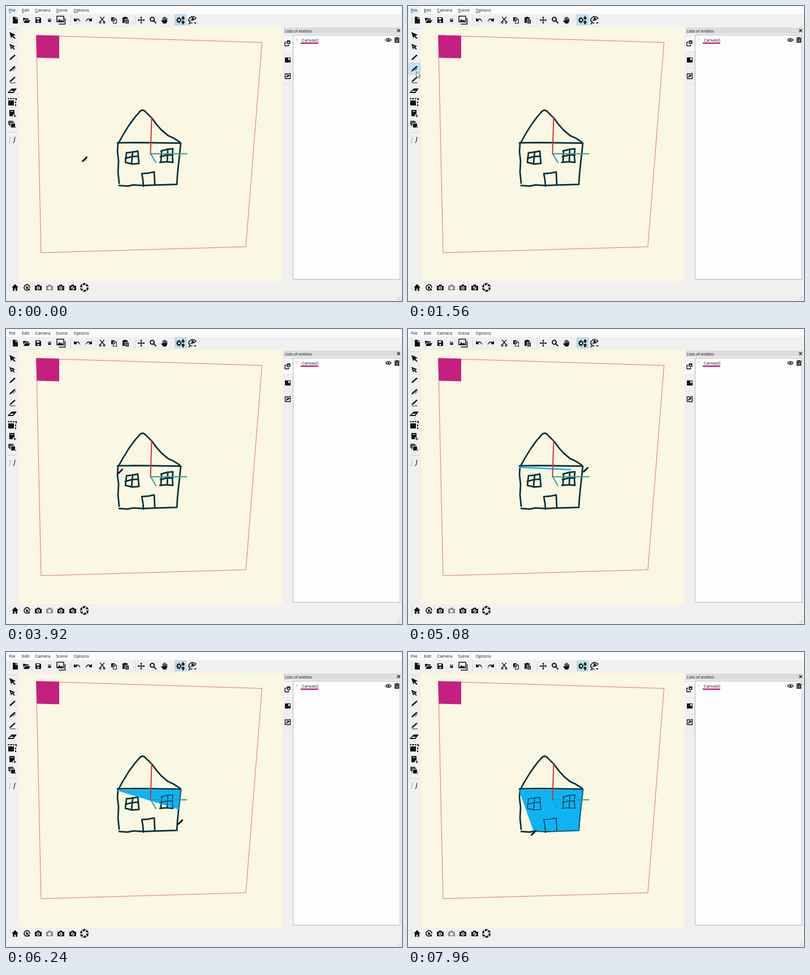
Recreate the animation shown at these times as an HTML page. Size 700x522 px, loop 8 s.

```html
<!DOCTYPE html>
<html lang="en">
<head>
<meta charset="utf-8">
<title>Lasso fill</title>
<style>
html, body { margin: 0; width: 100%; height: 100%; overflow: hidden; background: #f0f0f0; }
svg { display: block; width: 100%; height: 100%; }
text { font-family: "Open Sans", "Noto Sans", sans-serif; font-size: 7.4px; fill: #111; }
.line { fill: none; stroke-linecap: round; stroke-linejoin: round; }
</style>
</head>
<body>
<svg id="stage" viewBox="0 0 700 522">
  <defs>
    <clipPath id="inside"><polygon id="clipShape"/></clipPath>
    <g id="house" class="line" stroke="#052f3a">
      <path d="M200 241L206 230 217 212 228 197 235 189Q241 181 247 188L258 199 267 211 275 220 287 230 296 234 307 241"/>
      <path d="M197 242.500L230 242 270 242.500 309 243 307 262 305 280 303 300 302 316 270 317 243 318 225 317 215 319 200 318"/>
      <path d="M198 244L197 258 199 275 198 294 200 314"/>
      <path d="M213 260L224 259 233 257 234 268 235 279 223 280 211 277 213 260M224 258L222 279M211 270L222 267 234 266"/>
      <path d="M274 257L285 254 295 253 294 265 295 277 284 276 272 277M275 257L274 275M286 254L285 276M273 267L284 264 295 264"/>
      <path d="M243 319L242 308 240 297 252 296 262 294 263 316"/>
    </g>
  </defs>

  <rect width="700" height="522" fill="#f0f0f0"/>
  <rect width="700" height="14" fill="#fbfbfb"/>
  <rect id="fileGlow" y="1" width="22" height="13" fill="#e5f3fb"/>
  <g id="menu"></g>

  <rect x="23" y="36.500" width="466" height="450.500" fill="#faf7e2"/>
  <path d="M53.500 52L452.500 64.500 424 426 62 436.500Z" fill="none" stroke="#dc69a8"/>
  <path d="M53.500 51.500L94 52.500V92.500L54.500 91.500Z" fill="#c51f80"/>

  <use href="#house" stroke-width="2.700" y="-.4"/>
  <g class="line" stroke-width="2">
    <path d="M255.500 261L265 277" id="depth"/>
    <path d="M255.500 261.500H319.500" stroke="#2aa198"/>
  </g>
  <polygon id="fill" fill="#0fb3f5" stroke="#0fb3f5" stroke-width="1.600" stroke-linejoin="round"/>
  <g clip-path="url(#inside)">
    <use href="#house" stroke-width="1.400" y="-.4"/>
    <path d="M255.500 261.500H319.500" class="line" stroke="#2a9a94" stroke-width="1.500"/>
    <path d="M255.500 261L265 277" class="line" stroke="#2487a5"/>
  </g>
  <path d="M257.500 197L255.500 261" class="line" stroke="#d3303a" stroke-width="2"/>

  <rect x="491" y="38" width="207" height="11" fill="#dcdcdc"/>
  <text x="493" y="46.500" style="font-size:6.900px">Lists of entities</text>
  <path d="M691.500 41l5 5m0-5l-5 5" stroke="#111" stroke-width="1.100"/>
  <path d="M490.500 52.500H505.500M490.500 80.500H505.500M490.500 109.500H505.500M490.500 137.500H505.500" stroke="#e2e2e2"/>
  <rect x="490" y="53" width="17" height="27" fill="#f8f8f8"/>
  <rect x="507.500" y="51.500" width="189" height="432" fill="#fefefe" stroke="#b4b6ba"/>
  <path d="M512.500 57l2.500 2.500-2.500 2.500" fill="none" stroke="#999" stroke-width=".8"/>
  <text x="523" y="62.500">Canvas0</text>
  <rect x="521" y="64.500" width="31" height="2.500" fill="#c51f80"/>

  <rect id="toolGlow" x="1.500" y="101.500" width="20" height="19" fill="#c4e2f1" stroke="#9fd0ea"/>
  <rect x="299.500" y="15.500" width="19" height="18" fill="#c3e1f0" stroke="#a5d2ea"/>
  <g id="icons"></g>
  <g id="handles" fill="#aaa"></g>

  <path id="arrow" d="M0 0V10.500L2.400 8.300 4.100 12 5.800 11.300 4.200 7.600H7.300Z" fill="#fff" stroke="#333" stroke-width=".8"/>
  <g id="pen">
    <path id="smear" d="M2.500-1L5-6 10-7 9-3.500 5-1.500Z" fill="#b9b8ae"/>
    <path d="M-.3.300L.8-2.800 8.500-10.300 10.500-8.500 3-.800Z" fill="#101010"/>
  </g>
</svg>

<script>
const NS = "http://www.w3.org/2000/svg";
const $ = id => document.getElementById(id);
const LOOP = 8000;

function add(parent, tag, attrs, text) {
  const node = document.createElementNS(NS, tag);
  for (const key in attrs) node.setAttribute(key, attrs[key]);
  if (text) node.textContent = text;
  parent.appendChild(node);
  return node;
}

// Menu labels with mnemonic underlines
const underlines = [];
[["File", 5, 4], ["Edit", 28, 4], ["Camera", 51.5, 5], ["Scene", 88.5, 4], ["Options", 119.5, 6]].forEach(([label, x, w]) => {
  add($("menu"), "text", { x, y: 10 }, label);
  underlines.push(add($("menu"), "rect", { x, y: 11, width: w, height: 0.8, fill: "#222" }));
});

function icon(x, y, solid, outline, color = "#111", width = 1.4) {
  const g = add($("icons"), "g", { transform: `translate(${x} ${y})` });
  if (solid) add(g, "path", { d: solid, fill: color, "fill-rule": "evenodd" });
  if (outline) add(g, "path", { d: outline, class: "line", stroke: color, "stroke-width": width });
}

const camera = "M-6-3H-3L-2-5H2L3-3H6V5H-6ZM0-2A3 3 0 1 0 .01-2Z";
const pencil = "M-5.500 5L-4.500 2 3.500-5 5.500-3.500-2.500 3.800Z";
const pages = "M-5-5H1V2H-5ZM-2-3H3L5-1V6H-2ZM-1-2V5H4V-.5H2V-2Z";

// Top bar
icon(16, 25, "M-4-6H1V-2H5V6H-4ZM2-6L5-3H2Z");
icon(36, 25, "M-6-4H-2L-1-3H4V-1H-3L-5 3ZM-2 0H7L4 5H-5Z");
icon(57, 25, "M-5-5H3L5-3V5H-5ZM-3-4V-1H2V-4ZM0 1A1.600 1.600 0 1 0 .01 1Z");
icon(77, 25, "M-2.500-2.500H2.500V3H-2.500ZM-1.500-1.500V0H1.500V-1.500Z");
icon(97, 25, "M-6 3L-3-2 0 1 2-1 4 3Z", "M-7-7H5V3H-7ZM7.500-3V7H-3", "#111", 1.5);
icon(126, 25, "M-6-4V2H0L-2 0Q2-3 5 4 5-5-4-2Z");
icon(146, 25, "M6-4V2H0L2 0Q-2-3-5 4-5-5 4-2Z");
icon(170, 25, "", "M-3.500-5.500L3 2M3.500-5.500L-3 2M-3.500 2.500a1.500 1.500 0 1 0 .01 0ZM3.500 2.500a1.500 1.500 0 1 0 .01 0Z", "#111", 1.3);
icon(191, 25, pages);
icon(211, 25, "M-5-5H-2V-6H1V-5H4V-2H-1V5H-5ZM0-1H6V6H0ZM1 1V2H5V1ZM1 3.500V4.500H5V3.500Z");
icon(239, 25, "M0-6.500L2-4H-2ZM0 6.500L2 4H-2ZM-6.500 0L-4-2V2ZM6.500 0L4-2V2Z", "M0-4V4M-4 0H4", "#111", 1.3);
icon(260, 25, "", "M-1.500-5A3.500 3.500 0 1 0-1.490-5ZM1.500 1.500L5 5", "#111", 1.9);
icon(280, 25, "M-3 0H5V2L3 6H-2L-6 1-5 0-3 1.500Z", "M-2.500 1V-4M-.300 1V-5.500M1.900 1V-5M4.200 1V-3", "#111", 1.5);
icon(309, 25, "", "M-3-3A3 3 0 1 0-2.990-3ZM4-5A1.600 1.600 0 1 0 4.010-5ZM4 2A1.600 1.600 0 1 0 4.010 2Z", "#111", 2);
icon(309, 25, "", "M-3-5V-4M-3 4V5M-7.500 0H-7M-6.300-3.500L-5.500-2.700M-6.300 3.500L-5.500 2.700M4-6.500V-5M4 6V7", "#111", 1.7);
icon(329, 24, "M3 5H8L5.500 7.500ZM1-4A2.200 2.200 0 1 0 1.010-4Z", "M-6-1Q0-9 7-3Q3 2-2 1M-6-1L-6 3M-4 2V6H0M-4 6L-6 8", "#111", 1.5);

// Left bar
icon(11, 52, "M-5-6L6-1 2 1 6 5 4 6 0 2-2 5Z");
icon(11, 72, "M-5-5L5-1 2 1 5 5 3 5 0 2-2 5ZM-2-2L-1 1 1 0Z");
icon(11.5, 91, pencil);
icon(11.5, 111, pencil);
icon(11.5, 111, "", "M1 3L5-1", "#777", 1.5);
icon(11.5, 130, pencil, "M-4 6H5", "#222", 1);
icon(11, 150, "M-8 3L-1-4H8L2 4H-7ZM-5 2H1L3 0H-3Z");
icon(11, 170, "M-7-3H3V6H-7ZM5-1H7V2H5ZM5 4H7V7H5Z", "M-7-6H-6M-3-6H-1M2-6H3M6-6H7V-4", "#111", 2);
icon(11, 190, "M-5-6H4V2H1V5H-5ZM-3-4V-3H2V-4ZM2 4H4V2H5V4H7V5H5V7H4V5H2Z");
icon(11, 209, "M-2-1H5V6H-2ZM3 5H7L5 7Z", "M-6 1V-5H1M-4 3V-3H3", "#111", 1.5);
icon(11, 237, "", "M-3-5L-4-1-4 2-6 5", "#aaa", 1);
icon(11, 237, "", "M5-5L4-1 4 2 2 5", "#222", 1.2);

// Bottom bar
icon(16, 498, "M0-6L6 0H4V6H1V2H-1V6H-4V0H-6Z");
icon(37, 498, "M-2-3L3 0-1 4ZM1 2H5V6Z", "M4 3A5 5 0 1 1 5 0", "#111", 1.7);
[57, 77, 97, 118].forEach((x, i) => icon(x, 498, camera, "", i === 1 ? "#888" : "#111"));
icon(57, 499, "M-2 0L1-2V2Z");
icon(97, 499, "M2 0L-1-2V2Z");
icon(118, 499, "", "M-2 2L2-2");
for (let i = 0; i < 6; i++) {
  const g = add($("icons"), "g", { transform: `translate(138.500 498) rotate(${i * 60})` });
  add(g, "path", { d: "M-3.300-7A7.800 7.800 0 0 1 3.300-7L-2-3Z", fill: "#111" });
}

// Entity panel
icon(497.5, 66, "M-1-5H5V1H-1ZM.500-2.500V-.500H3.500V-2.500Z", "M-2.500-2H-4.500V4.500H2V2.500", "#111", 1.4);
icon(498, 95, "M-5-4H5V5H-5ZM1-3V1L2.500 0 4 1V-3Z");
icon(498, 124, "", "M0-4H-4.500V4.500H4.500V-4.500H2M-2 2Q-2-1 2-1M0-3L2.500-1 0 1", "#111", 1.4);
icon(676, 60, "M0-1.800A1.800 1.800 0 1 0 .01-1.800Z", "M-5 0Q0-6 5 0Q0 6-5 0Z", "#111", 1.2);
icon(691, 60, "M-4.500-4H-1.500V-5H1.500V-4H4.500V-2.500H-4.500ZM-4-2H4V5H-4ZM-2-1V4H-1V-1ZM1-1V4H2V-1Z");

// Dotted grips
function grip(x, y, dx, dy) {
  for (let i = 0; i < 7; i++) add($("handles"), "rect", { x: x + i * dx, y: y + i * dy, width: 1, height: 1 });
}
[6, 114, 228, 298].forEach(x => grip(x, 17, 0, 2.5));
[40, 223].forEach(y => grip(3, y, 2.5, 0));
grip(6, 490, 0, 2.5);
for (let i = 0; i < 3; i++)
  for (let j = 0; j <= i; j++) add($("handles"), "rect", { x: 691 + i * 2.5, y: 519 - j * 2.5, width: 1.2, height: 1.2 });

// [time, x, y]
const pointerKeys = [
  [120, 134, 276], [500, 103, 256], [1000, 30, 150], [1400, 15, 116], [1800, 15, 116],
  [2000, 76, 148], [2100, 132, 180], [2450, 369, 330], [2600, 423, 374], [2680, 426, 377],
  [2880, 426, 377], [3200, 345, 347], [3450, 240, 295], [3680, 194, 270], [3920, 197, 257],
  [4120, 196, 250], [4560, 196, 250], [4940, 287, 254], [5080, 309, 254], [5300, 311, 252],
  [5700, 310, 258], [6100, 305, 285], [6240, 303, 306], [6400, 303, 320], [6600, 299, 324],
  [7820, 222, 324.5], [7960, 217, 325]
];
const corners = [[4640, 197, 244.5], [5220, 308, 244.5], [6540, 302, 316.5]];
const fillKeys = [
  corners[0], [5080, 287, 249], corners[1], [5700, 308, 247],
  [6240, 305, 277.5], corners[2], [7960, 222.5, 316.5]
];

function along(keys, t) {
  const next = keys.findIndex(k => k[0] > t);
  if (next === 0) return keys[0].slice(1);
  if (next < 0) return keys[keys.length - 1].slice(1);
  const [t0, x0, y0] = keys[next - 1], [t1, x1, y1] = keys[next];
  const p = (t - t0) / (t1 - t0);
  return [x0 + (x1 - x0) * p, y0 + (y1 - y0) * p];
}

const show = (node, on) => node.setAttribute("visibility", on ? "visible" : "hidden");

function draw(t) {
  const [x, y] = along(pointerKeys, t);
  const focused = t < 1820 || t >= 2920;
  const overTool = x < 22 && y > 101 && y < 121;
  const isArrow = x < 23 || !focused;

  show($("fileGlow"), t < 1760);
  underlines.forEach(u => show(u, t < 1820));
  $("menu").querySelectorAll("text").forEach(n => { n.style.fill = focused ? "#111" : "#a5a5a5"; });
  show($("toolGlow"), overTool);
  $("depth").setAttribute("stroke", t < 1800 ? "#268fc8" : "#2aa0a5");

  $("arrow").setAttribute("transform", `translate(${x} ${y})`);
  $("pen").setAttribute("transform", `translate(${x} ${y})`);
  show($("arrow"), isArrow);
  $("pen").style.display = isArrow ? "none" : "";
  $("smear").style.display = t < 1400 ? "" : "none";

  const points = corners.filter(c => c[0] <= t).map(c => c.slice(1));
  if (points.length) points.push(along(fillKeys, t));
  const list = points.join(" ");
  $("fill").setAttribute("points", list);
  $("fill").setAttribute("stroke-width", points.length === 2 ? 2.5 : 1.6);
  $("clipShape").setAttribute("points", list);
}

function tick() {
  draw(performance.now() % LOOP);
  requestAnimationFrame(tick);
}
tick();
</script>
</body>
</html>
```
